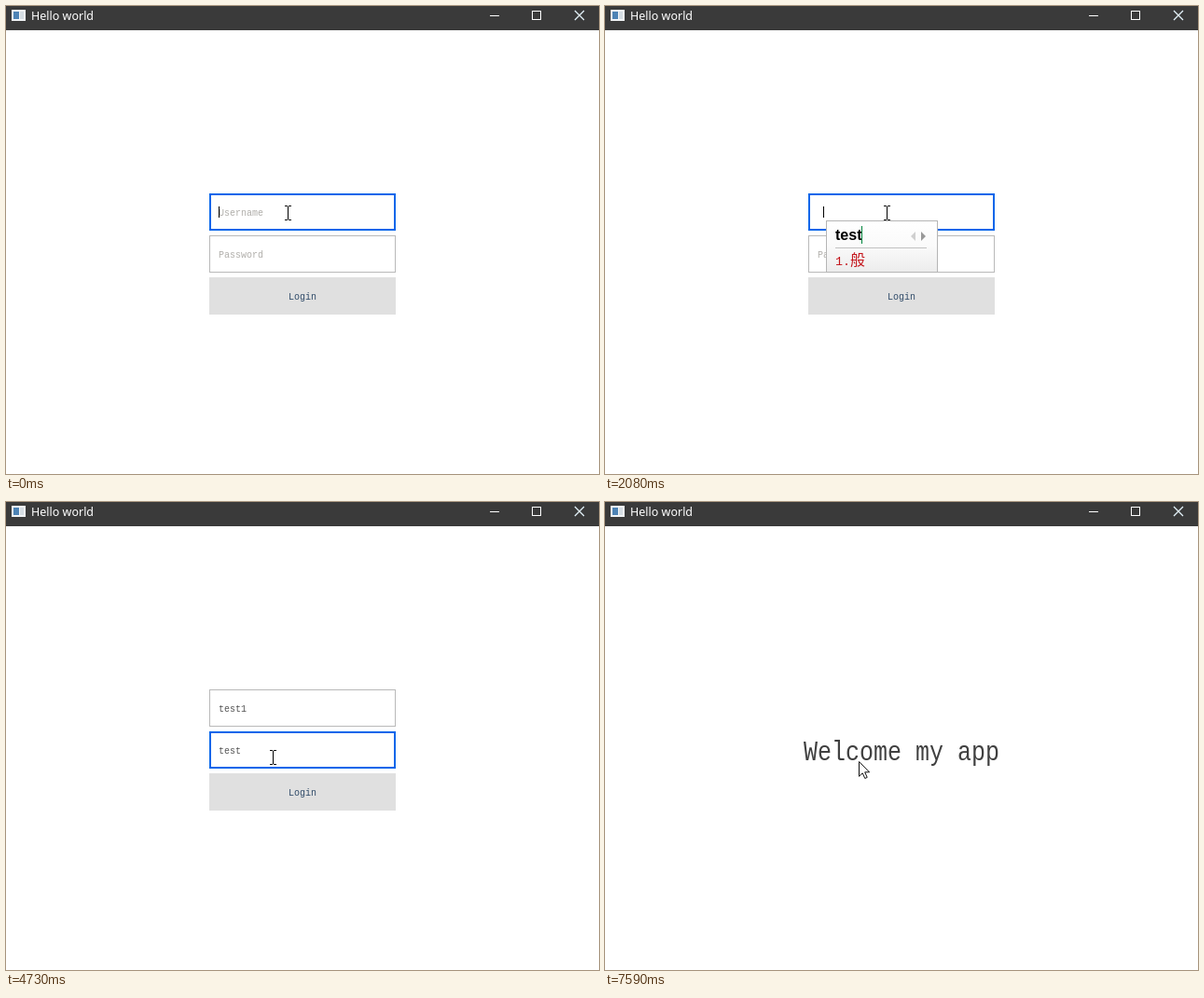
Write an HTML page that moves like this. It is 636 by 502 pixels and loops after 8680 ms.

```html
<!DOCTYPE html>
<html lang="en">
<head>
<meta charset="utf-8">
<title>Hello world</title>
<style>
  html, body { margin: 0; width: 100%; height: 100%; overflow: hidden; background: #fff; }
  svg { display: block; width: 636px; height: 502px; }
  text { white-space: pre; }
  .mono { font: 10px "Liberation Mono", monospace; fill: #555; }
  .mono.hint { fill: #b0aeaa; }
  .big { font-size: 25px; fill: #404040; }
  .title { font: 12.5px "Noto Sans", sans-serif; fill: #fff; }
  .typed { font: bold 16px "Liberation Sans", sans-serif; }
  .latin { font: 13.33px "Liberation Mono", monospace; }
  .hanzi { font: 300 16px "Noto Sans CJK SC", "Noto Sans CJK", sans-serif; }
  rect, .crisp { shape-rendering: crispEdges; }
  .field { fill: #fff; stroke: #b9b9b9; stroke-width: 1; }
  .field.focus { stroke: #0666ea; stroke-width: 2; }
</style>
</head>
<body>
<svg viewBox="0 0 636 502">
  <defs>
    <linearGradient id="shade" x2="0" y2="1">
      <stop offset="0" stop-color="#fff"/>
      <stop offset=".5" stop-color="#fafafa"/>
      <stop offset="1" stop-color="#ececec"/>
    </linearGradient>
  </defs>
  <rect width="636" height="502" fill="#fff"/>
  <rect width="636" height="26" fill="#3a3a3a"/>
  <rect x="6" y="4" width="15" height="12" fill="#f2f5f7"/>
  <rect x="8" y="6" width="6" height="8" fill="#4d83b5"/>
  <rect x="15" y="6" width="4" height="8" fill="#d5dde3"/>
  <text class="title" x="27" y="15">Hello world</text>
  <g fill="none" stroke="#fff">
    <path class="crisp" d="M519 10.5h10M564.5 5.5h9v9h-9z"/>
    <path d="M610 5l10 10M620 5l-10 10" stroke="#e4f3fb" stroke-width="1.3"/>
  </g>

  <g id="form">
    <rect id="userBox"/>
    <text id="userText" transform="translate(228 225) scale(1 1.15)"></text>
    <rect id="passBox"/>
    <text id="passText" transform="translate(228 270) scale(1 1.15)"></text>
    <rect id="button" x="218" y="291" width="200" height="40"/>
    <text id="login" class="mono" transform="translate(303 315) scale(1 1.15)">Login</text>
    <rect id="caret" width="1" height="12"/>
  </g>
  <text id="welcome" class="mono big" transform="translate(213 277) scale(1 1.2)">Welcome my app</text>

  <g id="beam" class="crisp">
    <path d="M-3 -8h3v1h-3zM1 -8h3v1h-3zM0 -7h1v14h-1zM-3 7h3v1h-3zM1 7h3v1h-3z"/>
  </g>
  <g id="ime"></g>
  <path id="arrow" d="M.5 .5V16.3L4.2 12.8L6.8 18.5L9.2 17.4L6.7 11.8H11.6Z" fill="#fff" stroke="#111"/>
  <circle id="click" r="12" fill="#ff0" opacity=".55"/>
</svg>
<script>
const LOOP = 8680;
const $ = id => document.getElementById(id);
const show = (id, on) => $(id).setAttribute("display", on ? "inline" : "none");
const place = (id, x, y) => $(id).setAttribute("transform", `translate(${x} ${y})`);

const candidates = {
  t: ["和", "笔记本t", "长期a", "生活i", "自己n"],
  te: ["舟", "身份w", "透明j", "般若a", "乘用e"],
  tes: ["舸", "透顶d", "般配g", "透析r", "盘查j"],
  test: ["般"]
};
const panelWidth = { t: 399, te: 360, tes: 344, test: 120 };

// Each entry lists only what changes at that time.
const steps = [
  [0, { focus: "user", user: "", pass: "", caret: true, composing: false, ime: "",
        beam: [302, 222], arrow: null, click: null, pressed: false, welcome: false }],
  [360, { click: [300, 221] }],
  [440, { click: null, caret: false }],
  [990, { caret: true }],
  [1310, { composing: true }],
  [1390, { ime: "t" }],
  [1460, { ime: "te" }],
  [1540, { ime: "tes", caret: false }],
  [1600, { ime: "test" }],
  [2080, { caret: true }],
  [2250, { ime: "", composing: false }],
  [2610, { user: "t" }],
  [2740, { user: "te" }],
  [2860, { user: "tes" }],
  [3030, { user: "test" }],
  [3180, { user: "test1" }],
  [3330, { beam: [299, 235] }],
  [3420, { beam: [290, 257] }],
  [3500, { beam: [286, 269] }],
  [3650, { beam: [286, 274], focus: "pass", click: [285, 273] }],
  [3720, { click: null }],
  [3870, { pass: "t" }],
  [3950, { pass: "te" }],
  [4030, { pass: "tes" }],
  [4180, { pass: "test" }],
  [4730, { caret: false }],
  [4810, { pass: "test2", caret: true, beam: [286, 281] }],
  [5040, { beam: null, arrow: [285, 292] }],
  [5120, { arrow: [285, 300] }],
  [5190, { arrow: [285, 306] }],
  [5270, { arrow: [285, 308], caret: false }],
  [5740, { focus: "", pressed: true, click: [285, 308] }],
  [5900, { welcome: true, click: null }]
];
const sweep = [[267, 301], [246, 287], [241, 270], [255, 252], [290, 240], [335, 237],
  [385, 243], [422, 262], [412, 290], [375, 312], [335, 316], [299, 298], [281, 286], [272, 278]];
sweep.forEach((arrow, i) => steps.push([6590 + Math.round(i * 1000 / 13), { arrow }]));

let merged = {};
const states = steps.map(([time, change]) => ({ time, ...(merged = { ...merged, ...change }) }));

function drawField(name, top, hint, s) {
  const focused = s.focus === name, inset = focused ? 1 : 0.5;
  const box = $(name + "Box"), text = $(name + "Text"), value = s[name];
  const size = { x: 218 + inset, y: top + inset, width: 200 - 2 * inset, height: 40 - 2 * inset };
  for (const key in size) box.setAttribute(key, size[key]);
  box.setAttribute("class", focused ? "field focus" : "field");
  text.setAttribute("class", value ? "mono" : "mono hint");
  text.textContent = value || (focused && s.composing ? "" : hint);
}

function candidateText(word, index, x) {
  const hanzi = word.replace(/[a-z]/g, ""), code = word.slice(hanzi.length);
  const end = x + 16 + 16 * hanzi.length;
  return {
    end: end + 8 * code.length,
    markup: `<g fill="${index ? "#17305c" : "#c4161c"}">
      <text class="latin" x="${x}" y="278">${index + 1}.</text>
      <text class="hanzi" x="${x + 16}" y="278">${hanzi}</text>
      <text class="latin" x="${end}" y="278">${code}</text></g>`
  };
}

function drawIme(typed) {
  if (!typed) { $("ime").innerHTML = ""; return; }
  const width = panelWidth[typed], right = 237 + width;
  let x = 247, words = "";
  candidates[typed].forEach((word, i) => {
    const c = candidateText(word, i, x);
    words += c.markup;
    x = c.end + 10;
  });
  $("ime").innerHTML = `
    <rect x="237.5" y="230.5" width="${width - 1}" height="55" fill="url(#shade)" stroke="#b5b5b5"/>
    <text id="typed" class="typed" x="247" y="251">${typed}</text>
    <rect id="imeCaret" y="236" width="1" height="19" fill="#00843c"/>
    <rect x="247" y="259" width="${width - 22}" height="1" fill="#c2c2c2"/>
    <path d="M${right - 24} 242v10l-5-5z" fill="#d0d0d0"/>
    <path d="M${right - 18} 242v10l5-5z" fill="#999"/>${words}`;
  $("imeCaret").setAttribute("x", Math.round(247 + $("typed").getComputedTextLength()));
}

function draw(s) {
  show("form", !s.welcome);
  show("welcome", s.welcome);
  drawField("user", 201, "Username", s);
  drawField("pass", 246, "Password", s);
  $("button").setAttribute("fill", s.pressed ? "#cecece" : "#e0e0e0");
  $("login").style.fill = s.pressed ? "#4a4a55" : "#2f4a68";
  show("caret", s.caret && s.focus);
  const length = s.composing ? 1 : (s[s.focus] || "").length;
  $("caret").setAttribute("x", 228 + 6 * length);
  $("caret").setAttribute("y", s.focus === "pass" ? 260 : 215);
  for (const id of ["beam", "arrow", "click"]) {
    show(id, s[id]);
    if (s[id]) place(id, ...s[id]);
  }
  drawIme(s.ime);
}

let current;
function tick() {
  const time = performance.now() % LOOP;
  const state = states.findLast(s => s.time <= time);
  if (state !== current) draw(current = state);
  requestAnimationFrame(tick);
}
tick();
</script>
</body>
</html>
```
